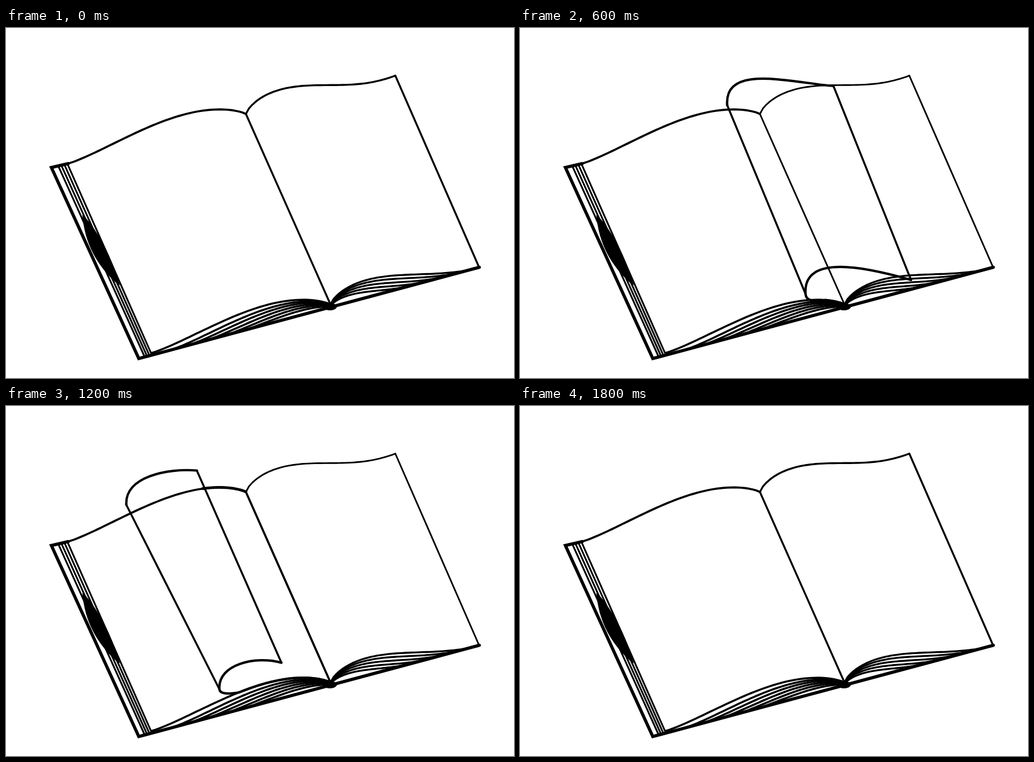
Animation, 901 px wide and 621 px high, one loop 1.9 s. Source, as an HTML page:

```html
<!DOCTYPE html>
<html lang="en">
<head>
<meta charset="utf-8">
<title>Page turning in a book</title>
<style>
html, body { margin: 0; width: 100%; height: 100%; overflow: hidden; background: #fff; }
svg { display: block; width: 100vw; height: 100vh; }
path { fill: none; stroke: #000; stroke-linejoin: round; stroke-linecap: round; }
.ink { fill: #000; }
</style>
</head>
<body>
<svg viewBox="0 0 901 621"><g id="book" transform="translate(.5 .5)"></g></svg>
<script>
const book = document.getElementById('book');
const STEP = 100, LOOP = 1900, LAST = 1800, SHEETS = 6;

// Corners of the open pages
const topLeft = [110, 240], topMid = [425, 152], topRight = [690, 84];
const lowLeft = [258, 576], lowMid = [575, 490], lowRight = [839, 425];

// Height of a resting sheet above its chord, u from 0 to 1
const leftHump = u => 152 * u ** 1.6 * (1 - u) ** 0.9;
const rightHump = u => 130 * u ** 0.7 * (1 - u) ** 2;
const rightTopHump = u => 1.03 * rightHump(u) - 5 * Math.sin(Math.PI * u * u);

const lerp = (a, b, u) => a.map((v, k) => v + (b[k] - v) * u);

function sheetPoint(a, b, hump, u) {
  const [x, y] = lerp(a, b, u);
  return [x, y - hump(u)];
}

function sheet(a, b, hump, from = 0) {
  const n = 48, pts = [];
  for (let i = 0; i <= n; i++)
    pts.push(sheetPoint(a, b, hump, from + (1 - from) * i / n));
  return 'M' + pts.join('L');
}

function draw(d, width, cls = '') {
  const p = document.createElementNS('http://www.w3.org/2000/svg', 'path');
  p.setAttribute('d', d);
  p.setAttribute('class', cls);
  p.style.strokeWidth = width;
  book.append(p);
  return p;
}

// Cover
draw('M110,240L80,247L235,586L839,424', 5.6).style.strokeLinejoin = 'miter';
const coverY = x => 586 - (x - 235) * 162 / 604;

// Page block at the left side
for (let i = 0; i < 4; i++)
  draw(`M${93 + i * 5.2},${246 - i * 1.7}L${245 + i * 4},${582 - i * 1.7}`, 3.1);
draw('M136,332Q178,380 200,455Q142,405 136,332Z', 2, 'ink');

// Page block along the bottom
for (let i = 0; i < SHEETS; i++) {
  const lx = lowLeft[0] + i * 32, rx = lowRight[0] - i * 30;
  const flat = 1 - i * 0.15;
  const left = i ? [lx, coverY(lx)] : lowLeft;
  const right = i ? [rx, coverY(rx)] : lowRight;
  const mid = [lowMid[0], lowMid[1] + i * 0.8];
  draw(sheet(left, mid, u => flat * leftHump(u)), 3.6);
  if (i < SHEETS - 1) draw(sheet(mid, right, u => flat * rightHump(u)), 3.3);
}
draw('M562,494a12,6 0 1 0 24,0a12,6 0 1 0 -24,0', 1, 'ink');

// Open pages
draw(sheet(topLeft, topMid, leftHump), 3.7);
const resting = [
  draw(sheet(topMid, topRight, rightTopHump), 3),
  draw(`M${topRight}L${lowRight}`, 3),
  draw(`M${topMid}L${lowMid}`, 3)
];

// Turning page
const topCurl = draw('', 4.2), lowCurl = draw('', 4.2);
const fold = draw('', 3.5), edge = draw('', 3.5);
const topFlat = draw('', 4.8), lowFlat = draw('', 4.4), hinge = draw(`M${topMid}L${lowMid}`, 3.7);

// Key poses: time, fold top and bottom, free corner top and bottom
const poses = [
  [0, topMid, lowMid, topRight, lowRight],
  [400, [390, 127], [541, 466], [599, 103], [746, 437]],
  [800, [344, 146], [471, 477], [512, 102], [640, 456]],
  [1000, [285, 163], [431, 486], [438, 133], [584, 476]],
  [1200, [213, 175], [378, 502], [338, 114], [488, 455]],
  [1400, [180, 229], [341, 524], [232, 155], [402, 491]],
  [LAST, [80, 247], [258, 566], [88, 240], [270, 560]]
];

// Curl between the fold and the free corner; lift raises the free end
function curl(f, c, lift) {
  const w = c[0] - f[0];
  const nearFold = [f[0] - w * 0.03, f[1] - w * 0.37 - 4];
  const nearCorner = [c[0] - w * 0.41, c[1] - w * lift];
  return `M${c}C${nearCorner} ${nearFold} ${f}`;
}

function render(time) {
  const t = Math.floor((time % LOOP) / STEP) * STEP;
  const turning = t > 0 && t < LAST;
  for (const p of [topCurl, lowCurl, fold, edge, lowFlat])
    p.style.display = turning ? '' : 'none';
  for (const p of resting) p.style.strokeWidth = turning ? 2.9 : 3.4;
  topFlat.style.display = hinge.style.display = 'none';
  if (!turning) return;

  const i = poses.findIndex(p => p[0] > t) - 1;
  const a = poses[i], b = poses[i + 1], u = (t - a[0]) / (b[0] - a[0]);
  const [A, B, C, D] = [1, 2, 3, 4].map(k => lerp(a[k], b[k], u));

  const bump = Math.exp(-(((t - 900) / 200) ** 2));
  topCurl.setAttribute('d', curl(A, C, 0.33 * bump - Math.max(0, t - 1200) / 800));

  // The lower curl tucks in under the fold and meets the flat sheet
  const meet = Math.min(0.98, (B[0] + 35 - lowLeft[0]) / (lowMid[0] - lowLeft[0]));
  const end = sheetPoint(lowLeft, lowMid, leftHump, meet);
  lowCurl.setAttribute('d', curl(B, D, 0.1 + 0.15 * bump) + `Q${[B[0] + 1, end[1] + 6]} ${end}`);
  lowFlat.setAttribute('d', sheet(lowLeft, lowMid, leftHump, meet));

  fold.setAttribute('d', `M${A}L${B}`);
  edge.setAttribute('d', `M${C}L${D}`);

  if (C[0] < topMid[0]) {
    const from = Math.max(0, (C[0] + 10 - topLeft[0]) / (topMid[0] - topLeft[0]));
    topFlat.setAttribute('d', sheet(topLeft, topMid, leftHump, from));
    topFlat.style.display = hinge.style.display = '';
  }
}

const start = performance.now();
function tick() {
  render(Math.max(0, performance.now() - start));
  requestAnimationFrame(tick);
}
tick();
</script>
</body>
</html>
```
